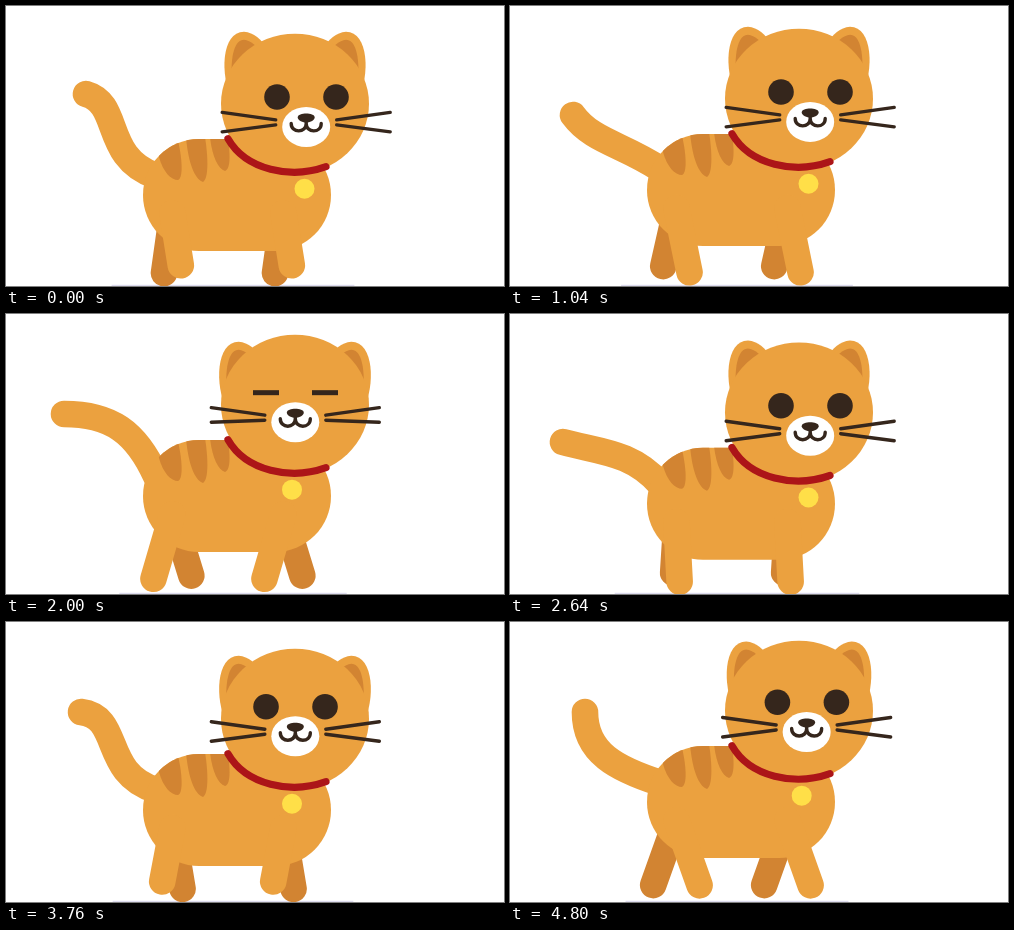
An HTML page for the animation above (4880 ms loop, 498x280 px).

```html
<!DOCTYPE html>
<html lang="en">
<head>
<meta charset="utf-8">
<title>Walking cat</title>
<style>
html, body { margin: 0; width: 100%; height: 100%; overflow: hidden; background: #fff; }
svg { display: block; width: 100vw; height: 100vh; }
.fur { fill: #eba13f; }
.shade { fill: #d28432; }
.ink { fill: #35261c; }
.line { fill: none; stroke: #35261c; stroke-width: 3.4; stroke-linecap: round; stroke-linejoin: round; }
.limb { fill: none; stroke: #eba13f; stroke-width: 26.6; stroke-linecap: round; }
.far { stroke: #d28432; }
</style>
</head>
<body>
<svg viewBox="0 0 498 280" xmlns="http://www.w3.org/2000/svg">
  <defs>
    <clipPath id="torso"><rect x="137" y="-112" width="188" height="112" rx="56"/></clipPath>
    <g id="ear">
      <path class="fur" d="M226 66C214 42 215 -2 238 -2C248 -1 255 5 262 16L245 62Z"/>
      <path class="shade" d="M226 48C224 21 229 6 238 6C245 7 251 12 256 20L244 58Z"/>
    </g>
  </defs>
  <rect id="shadow" y="278.8" height="2" fill="#dddbee"/>
  <path id="farLegs" class="limb far"/>
  <path id="tail" class="limb"/>
  <!-- the body's bottom edge is y = 0 in this group -->
  <g id="body">
    <rect class="fur" x="137" y="-112" width="188" height="112" rx="56"/>
    <g class="shade" clip-path="url(#torso)">
      <path d="M153 -94C157 -79 165 -71 172 -71C177 -73 177 -90 171 -115H150Z"/>
      <path d="M180 -114C182 -90 188 -72 197 -69C203 -73 202 -95 199 -114Z"/>
      <path d="M204 -114C206 -95 212 -82 219 -80C225 -82 224 -97 222 -114Z"/>
    </g>
  </g>
  <path id="nearLegs" class="limb"/>
  <!-- the top of the head is y = 0 in this group -->
  <g id="head">
    <use id="earL" href="#ear"/>
    <use id="earR" href="#ear"/>
    <ellipse class="fur" cx="289" cy="70" rx="74" ry="70"/>
    <path d="M222 105C240 136.5 285 145.5 320 133" fill="none" stroke="#ac1518" stroke-width="7.2" stroke-linecap="round"/>
    <g id="eyes" class="ink">
      <g id="open"><circle r="12.8"/><circle cx="59" r="12.8"/></g>
      <g id="shut"><rect x="-13" y="-2.5" width="26" height="5"/><rect x="46" y="-2.5" width="26" height="5"/></g>
    </g>
    <g id="muzzle">
      <ellipse rx="24" ry="20" fill="#fff"/>
      <path class="ink" d="M-8.5 -9.5C-8.5 -12.5 -4 -13.5 0 -13.5S8.5 -12.5 8.5 -9.5C8.5 -6.5 3 -4.5 0 -4.5S-8.5 -6.5 -8.5 -9.5Z"/>
      <path class="line" d="M-15 -3.5C-15 6.5 0 6.5 0 -3.5C0 6.5 15 6.5 15 -3.5M0 -7V-3.5"/>
      <path id="whiskers" class="line"/>
    </g>
    <circle id="tag" r="10" cy="155" fill="#ffdf48"/>
  </g>
</svg>
<script>
const LOOP = 4880, STEP = 80, STRIDE = 772, START = 291;

// phase in degrees, body bottom, then the tail: tip, two handles, root height
const POSES = [
  [9, 236, 75, 90, 75, 131, 107, 147, 161],
  [20, 237, 73, 94, 74, 133, 107, 147, 161],
  [56, 240, 63, 109, 82, 135, 112, 138, 163],
  [82, 245.8, 53, 128, 90, 138, 122, 138, 170],
  [143.5, 238, 58, 100, 105, 100, 130, 118, 162],
  [180, 235, 64, 89, 112, 89, 122, 128, 160],
  [244, 244, 75, 90, 116.5, 95, 95, 151, 168],
  [291, 245, 80, 88, 116, 98, 96, 151, 170]
];

const $ = id => document.getElementById(id);
const mod = (a, n) => ((a % n) + n) % n;
const move = (id, x, y, extra = '') => $(id).setAttribute('transform', `translate(${x} ${y})${extra}`);
const draw = (id, d) => $(id).setAttribute('d', d);
const show = (id, on) => $(id).setAttribute('visibility', on ? 'visible' : 'hidden');
const ease = (a, b, x) => {
  const u = Math.min(1, Math.max(0, (x - a) / (b - a)));
  return u * u * (3 - 2 * u);
};

// pose by wrapped index, with its phase unwrapped
function key(i) {
  const n = POSES.length, p = POSES[mod(i, n)];
  return [p[0] + 360 * Math.floor(i / n), ...p.slice(1)];
}

// smooth periodic curve through the poses
function poseAt(deg) {
  let i = -1;
  while (key(i + 1)[0] <= deg) i++;
  const [a, b, c, d] = [i - 1, i, i + 1, i + 2].map(key);
  const w = c[0] - b[0], u = (deg - b[0]) / w, v = 1 - u;
  return b.slice(1).map((y, j) => {
    const k = j + 1;
    const m0 = (c[k] - a[k]) / (c[0] - a[0]) * w;
    const m1 = (d[k] - b[k]) / (d[0] - b[0]) * w;
    return (1 + 2 * u) * v * v * y + u * v * v * m0 + u * u * (3 - 2 * u) * c[k] - u * u * v * m1;
  });
}

function legs(id, deg, bottom) {
  const r = deg * Math.PI / 180, s = Math.sin(r);
  const x = 166.4 + 23.5 * Math.cos(r), y = 263.2 + 4.5 * s * Math.abs(s);
  const leg = dx => `M${166.4 + dx} ${bottom - 38}L${x + dx} ${y}`;
  draw(id, leg(0) + leg(111));
}

function render(ms) {
  const total = START + 360 * ms / STRIDE;
  const deg = mod(total, 360), turn = mod(total, 720);
  const [bottom, x0, y0, x1, y1, x2, y2, y3] = poseAt(deg);

  legs('farLegs', deg + 180, bottom);
  legs('nearLegs', deg, bottom);
  draw('tail', `M${x0} ${y0}C${x1} ${y1} ${x2} ${y2} 150 ${y3}`);
  move('body', 0, bottom);
  move('head', 0, bottom - 217.3);

  const half = 111.5 + (bottom - 236) * 1.1;
  $('shadow').setAttribute('x', 227 - half);
  $('shadow').setAttribute('width', 2 * half);

  // the head turns once every two strides: 1 is right, 0 is left
  const h = turn < 55 ? ease(600, 770, turn + 720) : 1 - ease(295, 490, turn) + ease(600, 770, turn);
  const earX = 5.3 * (h - 1), earY = 9 * (1 - h);
  move('earL', earX, earY);
  move('earR', 578 - earX, earY, ' scale(-1 1)');
  move('eyes', 260 + 11 * h, 58 + 5.3 * h);
  move('muzzle', 289.3 + 10.9 * h, 87.5 + 5.7 * h);
  $('tag').setAttribute('cx', 286 + 12.5 * h * h);

  const blink = turn > 465 && turn < 541;
  show('open', !blink);
  show('shut', blink);
  const low = blink ? 0 : 5;
  draw('whiskers', [-1, 1].map(s =>
    `M${30.5 * s} -7L${84 * s} -14.5M${30.5 * s} -2L${84 * s} ${low}`).join(''));
}

let begin = null;
function tick(now) {
  if (begin === null) begin = now;
  render(Math.floor(mod(now - begin, LOOP) / STEP) * STEP);
  requestAnimationFrame(tick);
}
render(0);
requestAnimationFrame(tick);
</script>
</body>
</html>
```
